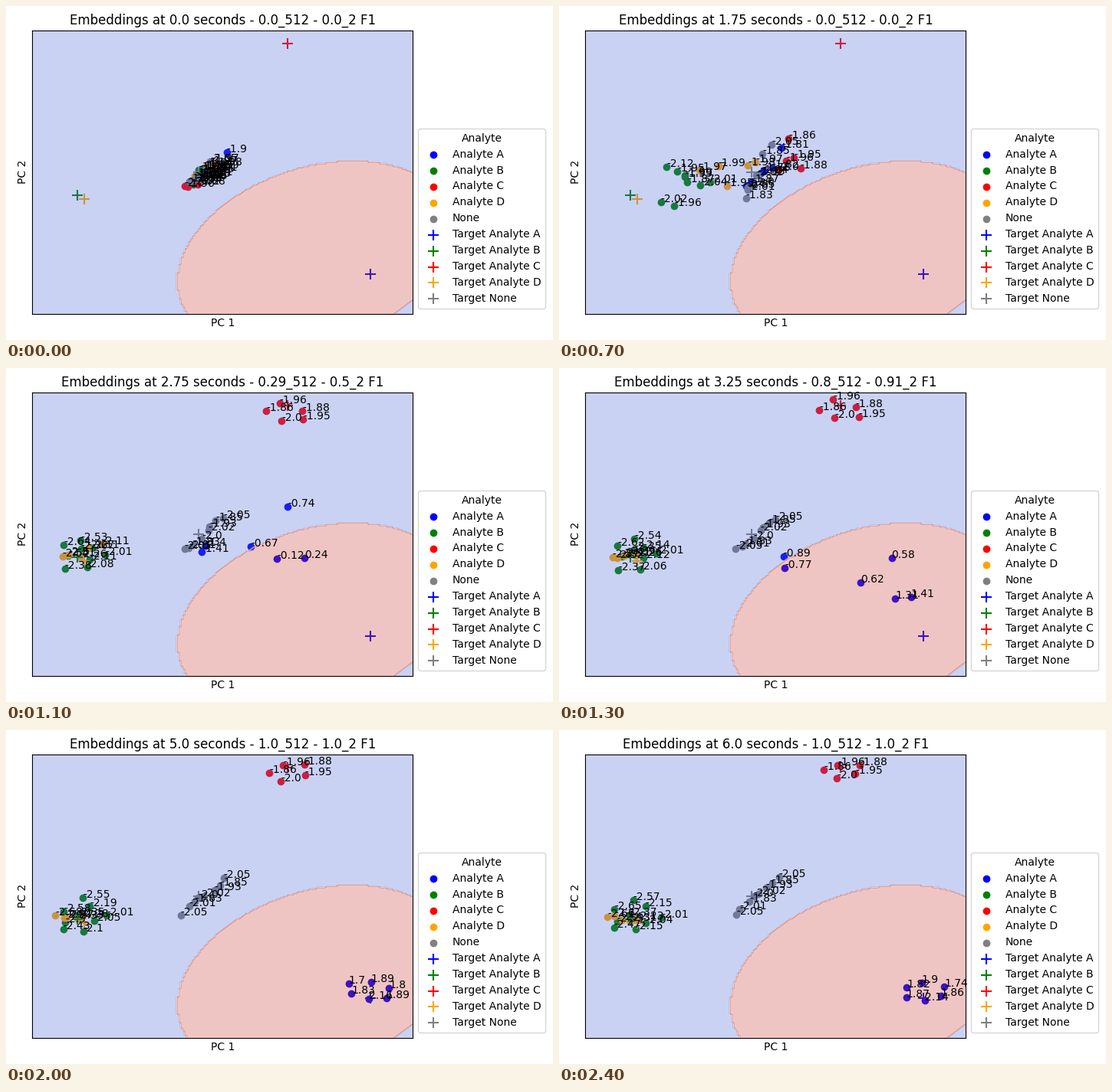
Animation of 713 by 436 pixels, one loop 2500 ms. Source, as a matplotlib script:

```python
import numpy as np
import matplotlib.pyplot as plt
from matplotlib.animation import FuncAnimation

W, H, DPI = 713, 436, 100
MARGIN, AW, AH = 34.42, 496, 369.6  # axes box in pixels
LEFT, BOTTOM = MARGIN, H - MARGIN
RIGHT, TOP = LEFT + AW, BOTTOM - AH
FRAMES, STEP = 25, 0.25

NAMES = ["Analyte A", "Analyte B", "Analyte C", "Analyte D", "None"]
COLORS = ["blue", "green", "red", "orange", "gray"]
TARGETS = [(475, 350), (93, 247), (367, 49), (102, 252), (251, 217)]

rng = np.random.default_rng(7)


def ring(n, cx, cy, rx, ry, first):
    a = np.radians(first) + 2 * np.pi * np.arange(n) / n
    return np.c_[cx + rx * np.cos(a), cy + ry * np.sin(a)]


def spiral(n, cx, cy, rx, ry, first):
    i = np.arange(n)
    a = np.radians(first + 137.5 * i)
    r = np.sqrt((i + 0.5) / n)
    return np.c_[cx + rx * r * np.cos(a), cy + ry * r * np.sin(a)]


def line(n, p, q):
    return np.linspace(p, q, n)


# Goal places, half-way times and steepness of each class's journey
GOALS = [
    ring(6, 475, 341, 28, 14, -90),
    spiral(9, 98, 245, 38, 24, 250),
    ring(5, 368, 54, 26, 11, 180),
    line(5, (66, 245), (98, 247)),
    line(8, (230, 239), (284, 195)),
]
LAGS = [
    np.array([2.84, 2.7, 2.9, 3.08, 3.6, 3.65]),
    np.linspace(1.55, 1.8, 9),
    np.linspace(1.75, 1.85, 5),
    np.linspace(1.85, 2.35, 5),
    np.full(8, 1.8),
]
RATES = [3, 5, 4.5, 4, 4]

SIZES = [len(g) for g in GOALS]
ENDS = np.cumsum([0] + SIZES)
COUNT, HITS = ENDS[-1], SIZES[0]
goal = np.concatenate(GOALS)
lag = np.concatenate(LAGS)
rate = np.repeat(RATES, SIZES)

# All points start in a slanted cloud
along = rng.uniform(0.35, 1, COUNT)
along[:HITS] = 0, 0.5, 0.65, 0.55, 0.9, 0.8
spread = rng.normal(0, 3, COUNT)
spread[:HITS] = 0
start = np.c_[286 - 48 * along + spread, 189 + 47 * along + spread]
phase = rng.uniform(0, 2 * np.pi, (COUNT, 2))
noise = rng.normal(0, 0.07, COUNT)


def places(t):
    s = 1 / (1 + np.exp(-rate * (t - lag)))
    x = start[:, 0] + (goal[:, 0] - start[:, 0]) * s
    y = start[:, 1] + (goal[:, 1] - start[:, 1]) * s ** 1.6
    y += 6 * s * (1 - s) * (start[:, 1] - 217)  # the cloud opens on its way
    return np.c_[x, y] + 3 * np.sin(1.3 * t + phase)


def scores(p, t):
    x, y = p.T
    v = -1.95 - 0.011 * np.maximum(0, 130 - x + 0.8 * (240 - y)) + noise
    own = 2.2 - 0.0147 * np.hypot(x - TARGETS[0][0], y - TARGETS[0][1])
    blend = np.clip((t - 1.5) / 1.25, 0, 1)
    v[:HITS] += blend * np.maximum(0, own - v)[:HITS]
    return v


def inside(x, y):
    """Tilted ellipse that marks the positive area."""
    u, v, tilt = (x - 402.7) / 179.7, (325.4 - y) / 123.4, 0.28
    return u * u - 2 * tilt * u * v + v * v <= 1 - tilt ** 2


def f1(found):
    n = int(found.sum())
    return round(2 * n / (n + HITS), 2)


fig = plt.figure(figsize=(W / DPI, H / DPI), dpi=DPI, facecolor="white")
ax = fig.add_axes([MARGIN / W, MARGIN / H, AW / W, AH / H])
ax.set(xlim=(LEFT, RIGHT), ylim=(BOTTOM, TOP), xticks=[], yticks=[],
       xlabel="PC 1", ylabel="PC 2")

dots = [ax.scatter([], [], color=c, label=n) for n, c in zip(NAMES, COLORS)]
for (x, y), n, c in zip(TARGETS, NAMES, COLORS):
    ax.scatter(x, y, s=100, marker="+", color=c, label=f"Target {n}")

# Decision areas lie over the markers and tint them
gx, gy = np.meshgrid(np.linspace(LEFT, RIGHT, 200), np.linspace(TOP, BOTTOM, 200))
ax.contourf(gx, gy, inside(gx, gy).astype(float), cmap="coolwarm", alpha=0.3)

labels = [ax.text(0, 0, "", fontsize=10) for _ in range(COUNT)]
title = ax.set_title("")
ax.legend(title="Analyte", loc="lower left", bbox_to_anchor=(1, 0))


def update(i):
    t = i * STEP
    p = places(t)
    v = scores(p, t)
    for d, a, b in zip(dots, ENDS, ENDS[1:]):
        d.set_offsets(p[a:b])
    for lab, xy, val in zip(labels, p, v):
        lab.set_position(xy)
        lab.set_text(str(round(float(val), 2)))
    full = f1(v[:HITS] > 0)
    flat = f1(inside(*p[:HITS].T))
    title.set_text(f"Embeddings at {t} seconds - {full}_512 - {flat}_2 F1")
    return [*dots, *labels, title]


anim = FuncAnimation(fig, update, frames=FRAMES, init_func=lambda: update(0),
                     interval=100, repeat=True, repeat_delay=0)
plt.show()
```
